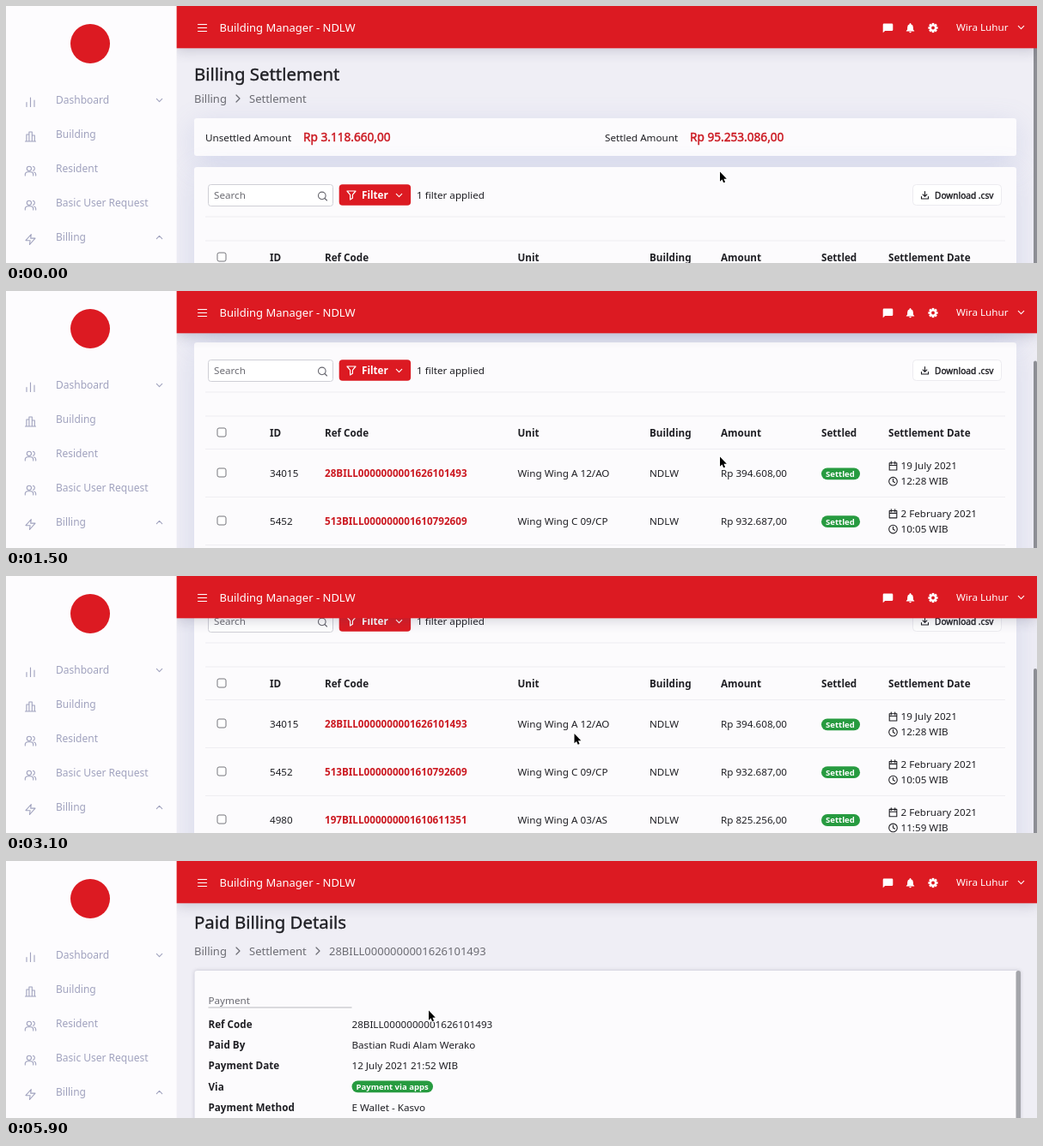
Animation, 1200 px wide and 300 px high, one loop 6000 ms. Source, as an HTML page with a canvas:

```html
<!DOCTYPE html>
<html lang="en">
<head>
<meta charset="utf-8">
<title>Billing Settlement</title>
<style>
html, body { margin: 0; width: 100%; height: 100%; overflow: hidden; background: #efeef5; }
canvas { display: block; width: 1200px; height: 300px; }
</style>
</head>
<body>
<canvas id="stage"></canvas>
<script>
const canvas = document.getElementById('stage');
const ctx = canvas.getContext('2d');
const ratio = window.devicePixelRatio || 1;
canvas.width = 1200 * ratio;
canvas.height = 300 * ratio;

const LOOP = 6000, STEP = 100, OPEN_AT = 4200;
const BODY = 11.66, SMALL = 9.55;
const RED = '#dc1a22', LINK = '#cb1820', GREEN = '#279b40';
const INK = '#1f1f24', GRAY = '#6c6c73', SIDE = '#a0a2be';
const PAPER = '#fcfbfd', LINE = '#efeef2';
const REF = '28BILL0000000001626101493';

const ICONS = {
  down: 'M-3.2 -1.6L0 1.6L3.2 -1.6',
  up: 'M-3.2 1.6L0 -1.6L3.2 1.6',
  right: 'M-2 -4L2 0L-2 4',
  menu: 'M-5 -4H5M-5 0H5M-5 4H5',
  bars: 'M-4.5 5V0M0 5V-5.5M4.5 5V-2.5',
  building: 'M-6 5.5H6M-4.6 5.5V-2.5H-1.6M-1.6 5.5V-5.5H1.8V5.5M1.8 -1.5H4.8V5.5',
  users: 'M-4.2 -2.7a2.6 2.6 0 1 0 5.2 0a2.6 2.6 0 1 0 -5.2 0M-6.2 5.5V4a2.8 2.8 0 0 1 2.8 -2.8H.4A2.8 2.8 0 0 1 3.2 4V5.5M3 -5.2a2.6 2.6 0 0 1 0 5M4.4 1.4A2.8 2.8 0 0 1 6.2 4V5.5',
  bolt: 'M.8 -6L-5.5 1.2H-.4L-1 6L5.5 -1.4H.2Z',
  chat: 'M-4.6 -5H4.6Q5.8 -5 5.8 -3.8V2.2Q5.8 3.4 4.6 3.4H-3.4L-5.8 5.8V-3.8Q-5.8 -5 -4.6 -5Z',
  bell: 'M0 -5.5Q.9 -5.5 .9 -4.3Q3.4 -3.5 3.4 -.5V2L4.7 3.4V4H-4.7V3.4L-3.4 2V-.5Q-3.4 -3.5 -.9 -4.3Q-.9 -5.5 0 -5.5ZM-1.2 4.6H1.2Q1.2 5.8 0 5.8T-1.2 4.6Z',
  funnel: 'M-5 -5H5L1.4 -.6V3.2L-1.4 5V-.6Z',
  search: 'M-5 -.6a4.3 4.3 0 1 0 8.6 0a4.3 4.3 0 1 0 -8.6 0M2.5 2.5L5 5',
  download: 'M0 -4.5V1M-2.3 -1L0 1.3L2.3 -1M-4 1.5V4H4V1.5',
  calendar: 'M-4.3 -3.6H4.3V4.7H-4.3ZM-4.3 -.8H4.3M-2.2 -5.3V-2.4M2.2 -5.3V-2.4',
  clock: 'M-4.8 0a4.8 4.8 0 1 0 9.6 0a4.8 4.8 0 1 0 -9.6 0M0 -2.8V.2L2 1.2',
  arrow: 'M0 0V11.2L2.5 8.9L4.2 12.8L6.1 12L4.4 8.2H7.8Z',
  hand: 'M-1.2 .8Q0 -.7 1.2 .8V5Q2.4 4 3.4 5.2Q4.6 4.3 5.6 5.7Q7.4 5.2 7.4 7V9.5Q7.4 11.4 6.2 13.6H.2Q-1 11.6 -3.9 8.4Q-4.3 6.6 -2.6 7L-1.2 8.3Z',
  knuckles: 'M1.4 9V11.6M3.3 9V11.6M5.2 9V11.6'
};
for (const k in ICONS) ICONS[k] = new Path2D(ICONS[k]);

const MENU = [
  ['bars', 'Dashboard', 110, 'down'],
  ['building', 'Building', 150],
  ['users', 'Resident', 190],
  ['users', 'Basic User Request', 230],
  ['bolt', 'Billing', 270, 'up']
];
const HEADS = [['ID', 307], ['Ref Code', 371], ['Unit', 595.5], ['Building', 749],
  ['Amount', 832], ['Settled', 949], ['Settlement Date', 1027]];
const ROWS = [
  ['34015', REF, 'Wing Wing A 12/AO', 'Rp 394.608,00', '19 July 2021', '12:28 WIB'],
  ['5452', '513BILL000000001610792609', 'Wing Wing C 09/CP', 'Rp 932.687,00', '2 February 2021', '10:05 WIB'],
  ['4980', '197BILL000000001610611351', 'Wing Wing A 03/AS', 'Rp 825.256,00', '2 February 2021', '11:59 WIB']
];
const DETAILS = [
  ['Ref Code', REF],
  ['Paid By', 'Bastian Rudi Alam Werako'],
  ['Payment Date', '12 July 2021 21:52 WIB'],
  ['Via', 'Payment via apps'],
  ['Payment Method', 'E Wallet - Kasvo']
];

// y is the middle of the capital letters
function text(str, x, y, color = INK, size = BODY, weight = 400) {
  ctx.font = `${weight} ${size}px "Noto Sans", sans-serif`;
  ctx.fillStyle = color;
  ctx.fillText(str, x, y + size * 0.357);
}

// a weight between regular and bold: regular with a thin outline
function mediumText(str, x, y, color, size, outline) {
  text(str, x, y, color, size);
  ctx.strokeStyle = color;
  ctx.lineWidth = outline;
  ctx.lineJoin = 'round';
  ctx.strokeText(str, x, y + size * 0.357);
}

function icon(name, x, y, color, width = 1.1) {
  ctx.save();
  ctx.translate(x, y);
  ctx.strokeStyle = ctx.fillStyle = color;
  ctx.lineWidth = width;
  ctx.lineCap = ctx.lineJoin = 'round';
  if (width) ctx.stroke(ICONS[name]);
  else ctx.fill(ICONS[name]);
  ctx.restore();
}

function box(x, y, w, h, r, fill, stroke) {
  ctx.beginPath();
  ctx.roundRect(x, y, w, h, r);
  if (fill) { ctx.fillStyle = fill; ctx.fill(); }
  if (stroke) { ctx.strokeStyle = stroke; ctx.lineWidth = 1; ctx.stroke(); }
}

function rule(x1, x2, y, color = LINE) {
  ctx.fillStyle = color;
  ctx.fillRect(x1, y - 0.5, x2 - x1, 1);
}

function shadow(color, blur, dy, draw) {
  ctx.save();
  ctx.shadowColor = color;
  ctx.shadowBlur = blur * ratio;
  ctx.shadowOffsetY = dy * ratio;
  draw();
  ctx.restore();
}

function card(y, h) {
  shadow('rgba(110,130,200,.2)', 34, 8, () => box(219, y, 957, h, 3, PAPER));
}

function badge(str, x, y, w) {
  box(x, y - 6.9, w, 13.8, 6.9, GREEN);
  text(str, x + 5, y, '#fff', SMALL, 700);
}

function crumbs(y, parts) {
  parts.forEach(([str, x], i) => {
    if (i) icon('right', x - 13, y, GRAY, 1.2);
    text(str, x, y, GRAY, 13);
  });
}

function drawList(scroll) {
  ctx.save();
  ctx.translate(0, -scroll);
  mediumText('Billing Settlement', 219, 80, INK, 20.4, 0.35);
  crumbs(108, [['Billing', 219], ['Settlement', 283]]);

  card(131, 44);
  card(188, 600);
  text('Unsettled Amount', 232, 153.5);
  mediumText('Rp 3.118.660,00', 346, 153.5, LINK, 13.65, 0.45);
  text('Settled Amount', 697, 153.5);
  mediumText('Rp 95.253.086,00', 796, 153.5, LINK, 13.65, 0.45);

  box(235.5, 208.5, 145, 25, 3, '#fff', '#cfcfd6');
  text('Search', 242, 221, GRAY);
  icon('search', 368.5, 222, '#66666e');
  box(387.7, 208.2, 83.4, 24.6, 4, RED);
  icon('funnel', 402, 221, '#fff', 1.2);
  text('Filter', 414, 221, '#fff', BODY, 700);
  icon('down', 457.5, 221, '#fff');
  text('1 filter applied', 478, 221);
  box(1055.5, 208.5, 103, 24, 4, '#fff', '#ecebf0');
  icon('download', 1069.5, 221, INK);
  mediumText('Download .csv', 1081, 221, INK, 10.15, 0.4);

  rule(232, 1163, 246);
  rule(232, 1163, 274);
  box(246, 288, 10, 10, 2, '#fff', '#77777d');
  for (const [str, x] of HEADS) text(str, x, 293.8, INK, BODY, 700);
  rule(232, 1163, 312.5);

  ROWS.forEach(([id, ref, unit, amount, date, hour], i) => {
    const y = 341 + i * 55.85;
    box(246, Math.round(y) - 6, 10, 10, 2, '#fff', '#77777d');
    text(id, 307, y);
    text(ref, 371, y, LINK, BODY, 700);
    text(unit, 595.5, y);
    text('NDLW', 749, y);
    text(amount, 832, y);
    badge('Settled', 949, y + 0.3, 45);
    icon('calendar', 1032.5, y - 8.7, INK);
    text(date, 1041.5, y - 8.9);
    icon('clock', 1032.5, y + 9.2, INK);
    text(hour, 1041.5, y + 9);
    rule(232, 1163, 368.5 + i * 56);
  });
  ctx.restore();
  box(1196, scroll * 0.66 - 3, 4, 340, 2, '#8d8e94');
}

function drawDetails() {
  mediumText('Paid Billing Details', 219, 72, INK, 20.4, 0.35);
  crumbs(105, [['Billing', 219], ['Settlement', 283], [REF, 376]]);
  shadow('rgba(80,80,110,.3)', 4, 0, () => box(219.5, 128, 961, 200, 3, PAPER));
  box(1175.5, 128, 5.5, 300, 2.7, '#a4a5aa');
  text('Payment', 235.5, 162.5, GRAY);
  rule(235.5, 402.5, 171, '#b9b9be');
  DETAILS.forEach(([label, value], i) => {
    const y = 191 + i * 24.15;
    text(label, 235.5, y, INK, BODY, 700);
    if (label === 'Via') badge(value, 402.5, y, 94.5);
    else text(value, 402.5, y);
  });
}

function drawFrame() {
  shadow('rgba(60,60,90,.22)', 14, 3, () => {
    ctx.fillStyle = RED;
    ctx.fillRect(198, 0, 1002, 49.3);
  });
  icon('menu', 228.5, 25.5, '#fff', 1.2);
  text('Building Manager - NDLW', 248.5, 25, '#fff', 13);
  icon('chat', 1026.5, 25.5, '#fff', 0);
  icon('bell', 1052.5, 25.5, '#fff', 0);
  drawGear(1079, 25.5);
  text('Wira Luhur', 1106, 25, '#fff');
  icon('down', 1181.5, 25, '#fff');

  ctx.fillStyle = '#fdfcfe';
  ctx.fillRect(0, 0, 198.6, 300);
  ctx.fillStyle = RED;
  ctx.beginPath();
  ctx.arc(98, 44, 23, 0, 7);
  ctx.fill();
  for (const [mark, label, y, chevron] of MENU) {
    icon(mark, 28.5, y + 2.5, SIDE);
    text(label, 58, y, SIDE, 12);
    if (chevron) icon(chevron, 178.5, y, SIDE);
  }
}

function drawGear(x, y) {
  ctx.save();
  ctx.translate(x, y);
  ctx.fillStyle = '#fff';
  for (let i = 0; i < 4; i++) {
    ctx.fillRect(-1.3, -5.6, 2.6, 11.2);
    ctx.rotate(Math.PI / 4);
  }
  ctx.beginPath();
  ctx.arc(0, 0, 4.2, 0, 7);
  ctx.fill();
  ctx.fillStyle = RED;
  ctx.beginPath();
  ctx.arc(0, 0, 1.9, 0, 7);
  ctx.fill();
  ctx.restore();
}

function drawCursor(x, y, hand) {
  if (hand) {
    icon('hand', x, y, '#fff', 0);
    icon('hand', x, y, '#111', 1.1);
    icon('knuckles', x, y, '#111', 0.9);
  } else {
    icon('arrow', x, y, '#fff', 2);
    icon('arrow', x, y, '#000', 0);
  }
}

const clamp = v => Math.min(1, Math.max(0, v));

function scrollAt(t) {
  const keys = [[100, 0], [600, 44], [1000, 85], [1500, 128]];
  if (t >= 1500) return 128 + 40 * (1 - (1 - clamp((t - 1500) / 800)) ** 2);
  for (let i = 1; i < keys.length; i++) {
    const [t0, a] = keys[i - 1], [t1, b] = keys[i];
    if (t <= t1) return a + (b - a) * clamp((t - t0) / (t1 - t0));
  }
}

function render(t) {
  ctx.setTransform(ratio, 0, 0, ratio, 0, 0);
  ctx.fillStyle = '#efeef5';
  ctx.fillRect(0, 0, 1200, 300);

  const list = t < OPEN_AT;
  if (list) drawList(Math.round(scrollAt(t)));
  else drawDetails();
  drawFrame();

  const p = clamp((t - 2700) / 800);
  const ease = p * p * (3 - 2 * p);
  const x = 831 - 339 * ease, y = 193.5 - 19 * ease;
  drawCursor(x, y, list && x < 537 && y < 181);
}

const start = performance.now();
function tick() {
  const t = (performance.now() - start) % LOOP;
  render(Math.floor(t / STEP) * STEP);
  requestAnimationFrame(tick);
}
tick();
</script>
</body>
</html>
```
